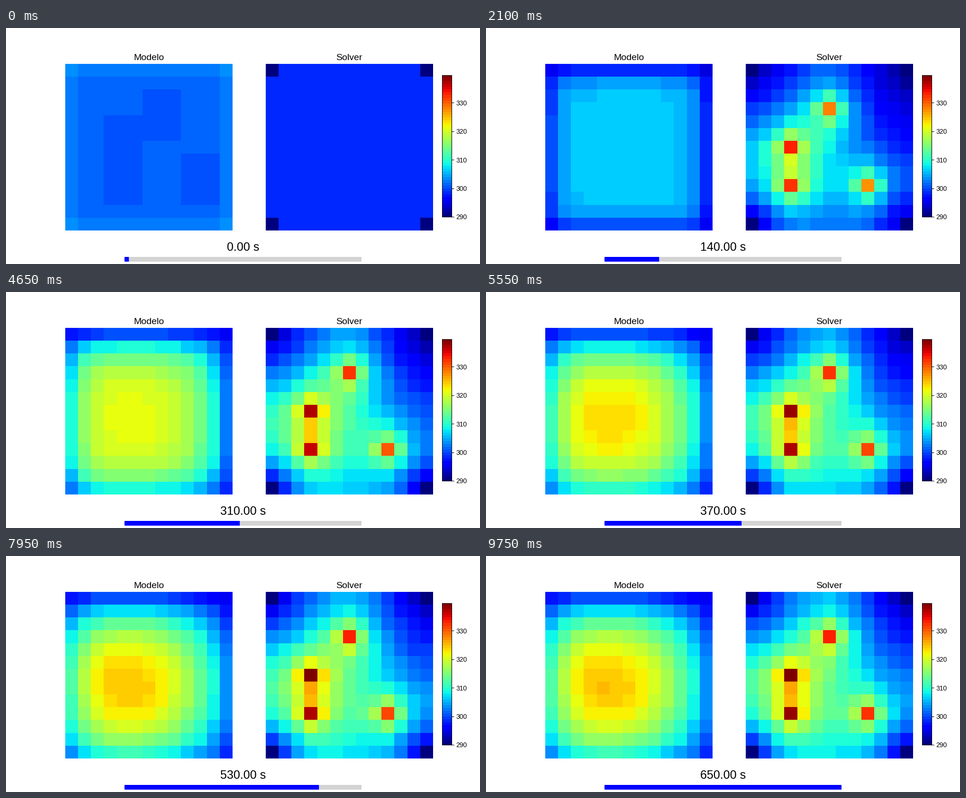
A matplotlib script for the animation above (9.9 s loop, 1000 px wide and 500 px high).

```python
import matplotlib.pyplot as plt
import numpy as np
from matplotlib.animation import FuncAnimation
from matplotlib.patches import Rectangle

plt.rcParams["font.family"] = "Liberation Sans"

N = 13
FRAMES, INTERVAL = 66, 150
STEP = 10  # simulated seconds per frame
T_MIN, T_MAX = 290, 339.65


def simulate():
    """Heated board: conduction, radiation from both faces, fixed corners."""
    dx, conductance, t_env = 0.1 / 12, 0.015, 279.5
    capacity = 2700 * 900 * 0.001 * dx**2
    radiation = 2 * 0.8 * 5.67e-8 * dx**2
    power = np.zeros((N, N))
    for node in [(6, 3), (3, 6), (9, 3), (9, 9)]:
        power[node] = 1.0
    corners = np.ix_([0, -1], [0, -1])
    temp = np.full((N, N), 298.0)
    temp[corners] = T_MIN
    history = [temp.copy()]
    for second in range(1, STEP * (FRAMES - 1) + 1):
        p = np.pad(temp, 1, mode="edge")
        flow = p[:-2, 1:-1] + p[2:, 1:-1] + p[1:-1, :-2] + p[1:-1, 2:] - 4 * temp
        heat = conductance * flow + power - radiation * (temp**4 - t_env**4)
        temp = temp + heat / capacity
        temp[corners] = T_MIN
        if second % STEP == 0:
            history.append(temp.copy())
    return history


def drop(center, first, last, exponent):
    """Fall from zero at the center to the given drops at both ends."""
    x = np.arange(N) - center
    reach = np.where(x < 0, center, N - 1 - center)
    return np.where(x < 0, first, last) * (np.abs(x) / reach) ** exponent


def predict(t):
    """Warm dome over a cool base: its rim cools first, then its peak grows."""
    cooling = min(t / 70, 1)
    growth = 1 - np.exp(-((t / 235) ** 2.3))
    base = 292
    height = 301.2 - 0.9 * cooling + 24.5 * growth - base
    exponent = 2.2 + 4 * (1 - growth**2)
    rim = -0.9
    rows = drop(6 + 0.8 * growth, rim + 3 * cooling + 22 * growth,
                rim + 4 * cooling + 10.5 * growth, exponent)
    cols = drop(6 - 2 * growth, rim + 1.5 * cooling + 12 * np.sqrt(growth),
                rim + 5 * cooling + 17 * growth, exponent)
    field = base + height * np.outer(1 - rows / height, 1 - cols / height)
    # Cooler strips, three columns wide, that fade as the rim cools
    for strip, (top, bottom) in enumerate([(4, 11), (2, 6), (7, 11)], start=1):
        field[top:bottom, 3 * strip:3 * strip + 3] -= 0.95 * (1 - cooling)
    return field


solver_fields = simulate()

fig, axes = plt.subplots(1, 2, figsize=(10, 5), dpi=100)
images = []
for ax, title, field in zip(axes, ["Modelo", "Solver"], [predict(0), solver_fields[0]]):
    images.append(ax.imshow(field, cmap=plt.get_cmap("jet", 50), vmin=T_MIN, vmax=T_MAX))
    ax.set_title(title, fontsize=14)
    ax.axis("off")

fig.colorbar(images[1], cax=fig.add_axes([0.92, 0.2, 0.02, 0.6]),
             ticks=range(290, 340, 10))

clock = fig.text(0.5, 0.055, "", fontsize=18, ha="center", va="baseline")

progress_ax = fig.add_axes([0.25, 0.01, 0.5, 0.02])
progress_ax.axis("off")
progress_ax.add_patch(Rectangle((0, 0), 1, 1, color="lightgray"))
progress = progress_ax.add_patch(Rectangle((0, 0), 0, 1, color="blue"))


def update(frame):
    t = frame * STEP
    images[0].set_data(predict(t))
    images[1].set_data(solver_fields[frame])
    clock.set_text(f"{t:.2f} s")
    progress.set_width((frame + 1) / FRAMES)
    return [*images, clock, progress]


animation = FuncAnimation(fig, update, frames=FRAMES, interval=INTERVAL,
                          repeat=True, repeat_delay=0)
plt.show()
```
